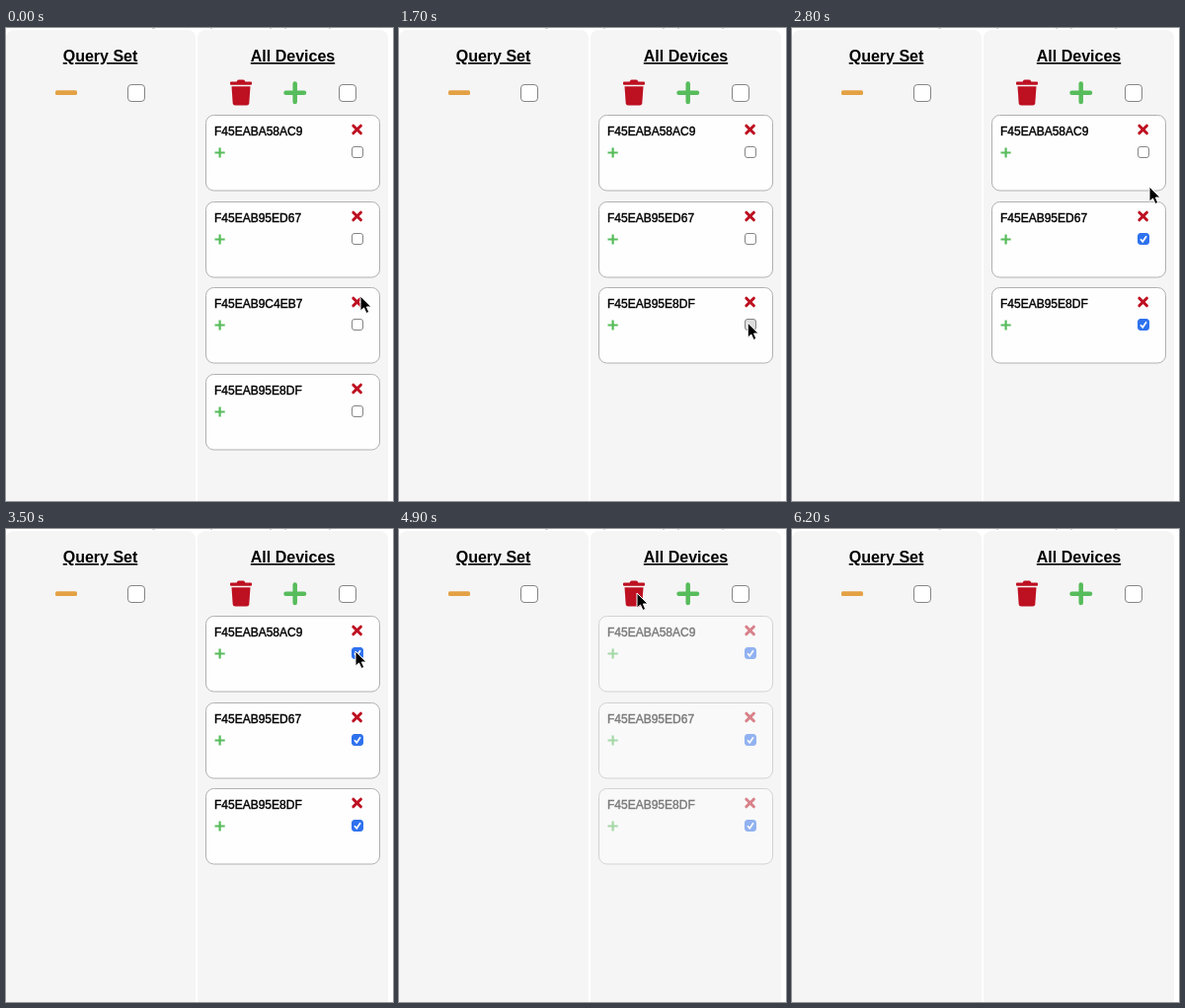
An HTML page that plays this animation: 392x480 px, repeating every 6.4 s.

```html
<!DOCTYPE html>
<html lang="en">
<head>
<meta charset="utf-8">
<title>Device list</title>
<style>
html, body { margin: 0; width: 100%; height: 100%; overflow: hidden; background: #fff; }
svg { display: block; }
text { font-family: "Liberation Sans", Arial, Helvetica, sans-serif; }
.title { font-size: 16px; font-weight: bold; text-decoration: underline; text-anchor: middle; }
.label { font-size: 12px; stroke: #000; stroke-width: .4px; }
.panel { fill: #f5f5f5; }
.card { fill: #fefefe; stroke: #b0b0b0; }
.box { fill: #fff; stroke: #858585; }
.red { fill: #bd1021; }
.cross { stroke: #bd1021; stroke-width: 3; stroke-linecap: round; }
.plus { stroke: #57bc5b; }
</style>
</head>
<body>
<svg width="392" height="480" viewBox="0 0 392 480">
  <path d="M148 0h3M207 0h2M267 0h2M282 0h2M327 0h2" stroke="#aaa"/>
  <rect class="panel" y="2" width="192" height="500" rx="8"/>
  <rect class="panel" x="194" y="2" width="193" height="500" rx="8"/>
  <text class="title" x="95.5" y="34">Query Set</text>
  <text class="title" x="290.5" y="34">All Devices</text>
  <rect x="50" y="63.2" width="22" height="4.8" rx="1.6" fill="#e3a144"/>
  <rect class="box" x="123.5" y="57.5" width="17" height="17" rx="3.5"/>
  <g class="red">
    <path d="M228 54.5h5.600l.9-1.500q.4-.6 1.100-.6h4.800q.7 0 1.100.6l.9 1.500h5.600q1 0 1 1v1.300q0 .9-1 .9h-20q-1 0-1-.9v-1.300q0-1 1-1z"/>
    <path d="M228.500 59.200h19l-1.200 17q-.2 2.300-2.400 2.300h-11.800q-2.200 0-2.400-2.300z"/>
  </g>
  <path class="plus" d="M283.500 65.800h18.500M292.700 56.500v18.500" stroke-width="4.500" stroke-linecap="round"/>
  <rect class="box" x="337.500" y="57.500" width="17" height="17" rx="3.500"/>
  <g id="cards"></g>
  <path id="cursor" d="M0 0V15.200L3.500 12L6 17.500L8.700 16.300L6.300 11H11z" stroke="#fff" stroke-width="1" stroke-linejoin="round"/>
</svg>
<script>
const LOOP = 6400, STEP = 100;
const pointer = document.getElementById('cursor');
const tops = [88.5, 176.5, 263.5, 351.5];

// press: mouse down on the checkbox; check: it becomes ticked; fade: start of removal
const devices = [
  { id: 'F45EABA58AC9', press: 3400, check: 3500, fade: 4700 },
  { id: 'F45EAB95ED67', press: 2400, check: 2500, fade: 4700 },
  { id: 'F45EAB9C4EB7', press: LOOP, check: LOOP, fade: 620 },
  { id: 'F45EAB95E8DF', press: 1700, check: 1800, fade: 4700 }
];

// time, x, y of the pointer tip
const path = [
  [0, 359, 272], [400, 357, 276], [1200, 357, 276], [1500, 354, 299],
  [1800, 353, 299], [1900, 356, 244], [2200, 356, 215], [2600, 356, 215],
  [2800, 362, 161], [3300, 354, 124], [3600, 354, 124], [4300, 241, 65],
  [5200, 241, 65], [5500, 205, 38]
];

const ease = p => (1 - Math.cos(Math.PI * Math.min(1, Math.max(0, p)))) / 2;

document.getElementById('cards').innerHTML = devices.map(d => `<g>
  <rect class="card" x="202.5" width="176" height="76.5" rx="8"/>
  <text class="label" x="211" y="20">${d.id}</text>
  <path class="cross" d="M351.800 10.700l7.600 7.600m0-7.600l-7.600 7.600"/>
  <path class="plus" d="M211.500 38h10.200M216.600 32.900v10.200" stroke-width="2.200"/>
  <rect class="box" x="350.500" y="32" width="11" height="11" rx="2.500"/>
  <path class="tick" d="M353 37.700l2.200 2.600l3.800-5.600" fill="none" stroke="#fff" stroke-width="1.700"/>
</g>`).join('');

devices.forEach((d, i) => {
  d.node = document.getElementById('cards').children[i];
  d.box = d.node.querySelector('.box');
  d.tick = d.node.querySelector('.tick');
});

function pointerAt(t) {
  const i = path.findIndex(k => k[0] > t);
  if (i < 0) return path[path.length - 1].slice(1);
  const [t0, x0, y0] = path[i - 1], [t1, x1, y1] = path[i];
  const p = ease((t - t0) / (t1 - t0));
  return [x0 + (x1 - x0) * p, y0 + (y1 - y0) * p];
}

function draw(t) {
  devices.forEach((d, i) => {
    const slot = i === 3 && t >= 1100 ? 2 : i;
    const checked = t >= d.check;
    d.node.setAttribute('transform', `translate(0 ${tops[slot]})`);
    d.node.style.opacity = 1 - ease((t - d.fade) / 400);
    d.box.style.fill = checked ? '#2f72ee' : t >= d.press ? '#dcdcdc' : '';
    d.box.style.stroke = checked ? '#2f72ee' : '';
    d.tick.style.display = checked ? '' : 'none';
  });
  pointer.setAttribute('transform', `translate(${pointerAt(t)})`);
  pointer.style.display = t < 5600 ? '' : 'none';
}

const start = performance.now();
function tick() {
  const t = (performance.now() - start) % LOOP;
  draw(Math.floor(t / STEP) * STEP);
  requestAnimationFrame(tick);
}
tick();
</script>
</body>
</html>
```
